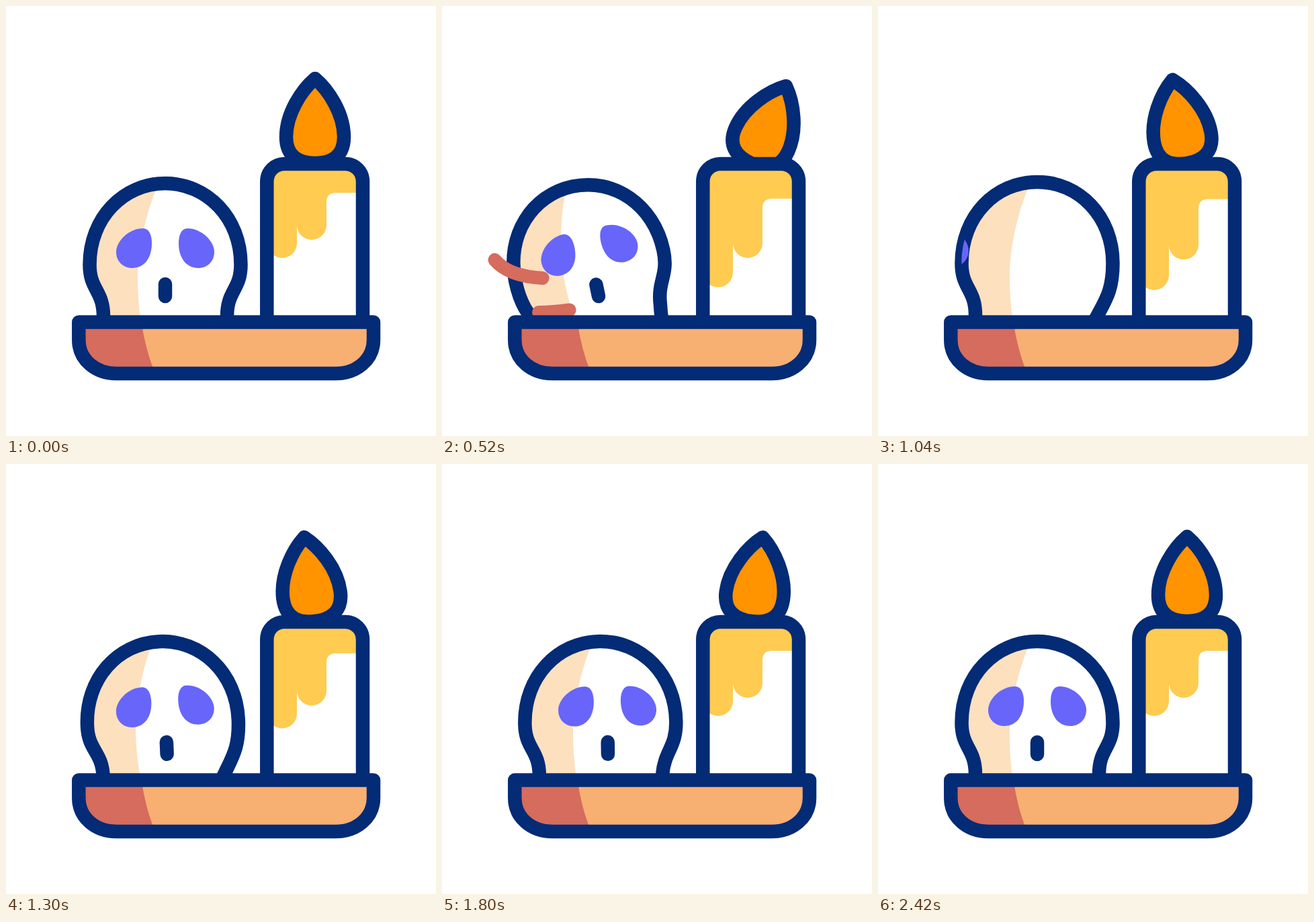
These frames come from a looping animation (640 by 640 pixels, 3.6 s). An HTML page:

```html
<!DOCTYPE html>
<html lang="en">
<head>
<meta charset="utf-8">
<title>Skull and candle</title>
<style>
  html, body { margin: 0; height: 100%; overflow: hidden; background: #fff; }
  svg { display: block; width: 100%; height: 100%; }
  .line, .trail { fill: none; stroke: #032b76; stroke-width: 20.5; stroke-linecap: round; stroke-linejoin: round; }
  .trail { stroke: #d56c5e; stroke-width: 20; }
</style>
</head>
<body>
<svg viewBox="0 0 640 640">
  <defs>
    <path id="skull"/>
    <clipPath id="inSkull"><use href="#skull"/></clipPath>
    <rect id="candle" x="388.3" y="235" width="142.7" height="260" rx="26"/>
    <clipPath id="inCandle"><use href="#candle"/></clipPath>
    <path id="plate" d="M108.3 470.5H547V497C547 527 521 547 491 547H164C134 547 108.3 527 108.3 497Z"/>
    <clipPath id="inPlate"><use href="#plate"/></clipPath>
    <path id="eye" fill="#6865fa" d="M204 331C213 331 217 341 217 353C217 376 205 390 188 390C174 390 164 380 164 366C164 350 183 331 204 331Z"/>
  </defs>

  <path id="flame" class="line" style="fill:#ff9300" d="M460 108C440 125 417 160 417 195C417 224 436 234 460 234C484 234 503 224 503 195C503 160 480 125 460 108Z"/>

  <use href="#candle" fill="#fff"/>
  <path id="wax" fill="#ffcb50" clip-path="url(#inCandle)"/>
  <use href="#candle" class="line"/>

  <g id="head">
    <use href="#skull" fill="#fff"/>
    <path fill="#fde0be" clip-path="url(#inSkull)" d="M228 262C206 312 196 365 196 405C196 432 198 455 206 510H60V240H228Z"/>
    <use href="#skull" class="line"/>
    <g clip-path="url(#inSkull)">
      <g id="face">
        <use href="#eye"/>
        <use href="#eye" transform="matrix(-1 0 0 1 474 0)"/>
        <path class="line" d="M237 414V432"/>
      </g>
    </g>
    <path class="trail" pathLength="1" d="M101 347C136 414 338 414 373 347"/>
    <path class="trail" pathLength="1" d="M149 437C200 447 274 447 325 437"/>
  </g>

  <use href="#plate" fill="#f8af72"/>
  <path fill="#d56c5e" clip-path="url(#inPlate)" d="M201 465Q206 508 222 547H100V465Z"/>
  <use href="#plate" class="line"/>
</svg>
<script>
const LOOP = 3600, STEP = 20;
const TURN = 578, WINDUP = 16, OVERSHOOT = 36;
const $ = id => document.getElementById(id);
const trails = document.querySelectorAll('.trail');

// Smooth rise from 0 to 1 between two times
function ease(t, from, to) {
  const u = Math.min(Math.max((t - from) / (to - from), 0), 1);
  return u * u * (3 - 2 * u);
}

// Half of the skull, top to foot; pinch narrows the jaw from 0 to 1
function half(pinch, sign) {
  return [
    [62, 264], [112.5, 315], [112.5, 385],
    [112.5, 423], [103 - 11 * pinch, 438 - 15 * pinch], [90 + 2 * pinch, 462],
    [76 + 16 * pinch, 486], [76 + 16 * pinch, 500], [76 + 16 * pinch, 510]
  ].map(([x, y]) => [237 + sign * x, y]);
}

function skullPath(left, right) {
  const [foot, ...back] = [[237, 264], ...half(left, -1)].reverse();
  return `M237 264C${half(right, 1).join(' ')}L${foot}C${back.join(' ')}Z`;
}

function waxPath(melt) {
  const top = 278 + 12 * melt, mid = 326 + 37 * melt, low = 353 + 60 * melt;
  return `M380 230H540V${top}H491Q477 ${top} 477 ${top + 14}V${mid}A22 22 0 0 1 433 ${mid}`
    + `V${low}A22 22 0 0 1 389 ${low}H380Z`;
}

function draw(t) {
  // Skull: wind up left, spin once to the right, overshoot, settle
  const tilt = 12 * (ease(t, 540, 1040) - ease(t, 100, 540)) + 3 * (ease(t, 1400, 2000) - ease(t, 1040, 1400));
  const drop = 6 * ease(t, 0, 300) - 11 * ease(t, 300, 720) + 5 * ease(t, 720, 1300);
  const turn = (TURN + WINDUP + OVERSHOOT) * ease(t, 410, 1440)
    - WINDUP * ease(t, 0, 400) - OVERSHOOT * ease(t, 1440, 2000);
  const jawLeft = 1 - ease(t, 0, 300) + ease(t, 640, 1040);
  const jawRight = 1 - ease(t, 400, 760) + ease(t, 1520, 1960);
  $('skull').setAttribute('d', skullPath(jawLeft, jawRight));
  $('head').setAttribute('transform', `translate(0 ${drop}) rotate(${tilt} 237 470)`);
  $('face').setAttribute('transform', `translate(${turn > TURN / 2 ? turn - TURN : turn} 0)`);

  const tail = ease(t, 540, 840), length = ease(t, 460, 640) - tail;
  for (const trail of trails) {
    trail.style.display = length > 0.001 ? '' : 'none';
    trail.setAttribute('stroke-dasharray', `${length} 3`);
    trail.setAttribute('stroke-dashoffset', -tail);
  }

  const sway = 30 * ease(t, 0, 720) - 42 * ease(t, 720, 1090) + 20 * ease(t, 1090, 1760) - 8 * ease(t, 1760, 2420);
  $('flame').setAttribute('transform', `rotate(${sway} 460 234)`);
  $('wax').setAttribute('d', waxPath(t < 1600 ? Math.sin(Math.PI * t / 1600) ** 2 : 0));
}

const start = performance.now();
function tick() {
  const t = (performance.now() - start) % LOOP;
  draw(Math.floor(t / STEP) * STEP);
  requestAnimationFrame(tick);
}
tick();
</script>
</body>
</html>
```
